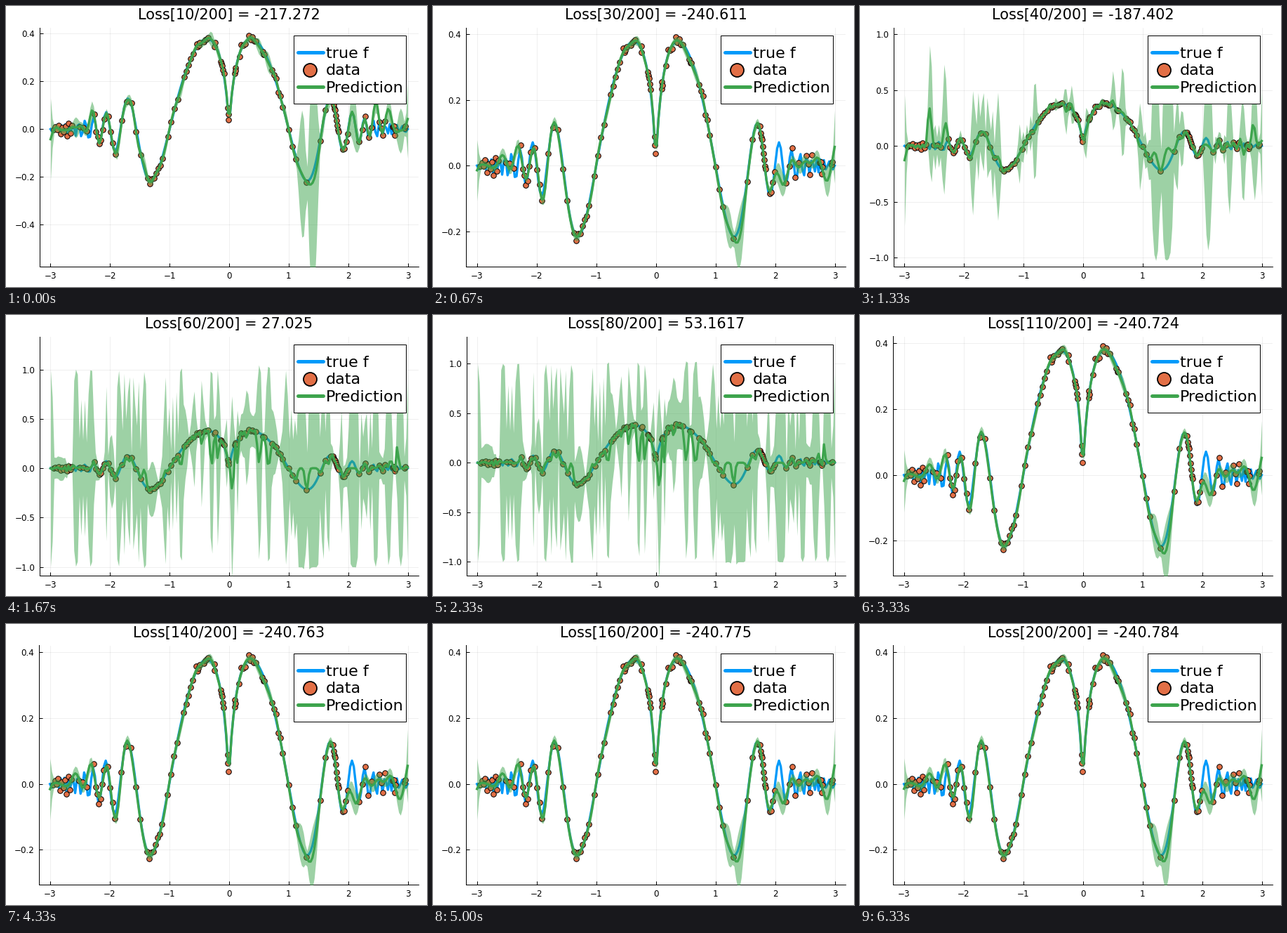
Write a matplotlib script that moves like this. It is 600 px wide and 400 px high and loops after 6660 ms.

```python
import numpy as np
import matplotlib.pyplot as plt
from matplotlib.animation import FuncAnimation
from matplotlib.patches import Rectangle

W, H, DPI = 600, 400, 100
PX = 72 / DPI  # points per pixel
BLUE, ORANGE, GREEN = "#009afa", "#e26f46", "#3da44d"
TOP, BOTTOM, RIGHT = 30.5, 371, 587.8
FRAMES = 20
NOISE = 0.02
GRID = np.linspace(-3, 3, 200)

plt.rcParams["font.family"] = "DejaVu Sans"

# Sampled stretches of the x axis: start, end, number of points.
STRETCHES = [
    (-2.945, -2.64, 12), (-2.51, -2.39, 3), (-2.262, -2.1, 7),
    (-2.033, -1.915, 4), (-1.803, -1.485, 5), (-1.367, -1.12, 8),
    (-1.031, -.865, 4), (-.755, -.605, 5), (-.548, -.495, 4),
    (-.424, -.348, 4), (-.245, -.237, 2), (-.14, -.088, 5),
    (-.022, -.007, 3), (.1, .108, 3), (.171, .271, 4), (.33, .448, 5),
    (.56, .595, 3), (.72, .9, 6), (1.002, 1.119, 3), (1.302, 1.302, 1),
    (1.532, 1.709, 3), (1.744, 1.838, 9), (1.909, 1.991, 4),
    (2.186, 2.392, 5), (2.522, 2.616, 4), (2.75, 2.793, 5), (2.946, 2.957, 2)]

# Training before it settles: kernel length, loss, lowest and highest value.
TRAINING = [
    (.105, -217.272, -.548, .398), (.125, -233.514, -.4, .4),
    (.16, -240.611, -.2875, .4007), (.05, -187.402, -1.02, 1.0),
    (.032, -61.3847, -.975, 1.2), (.025, 27.025, -1.02, 1.266),
    (.023, 42.3182, -1.03, 1.25), (.022, 53.1617, -1.071, 1.2056),
    (.045, -118.206, -1.0, 1.1)]


def true_f(x):
    a = np.abs(x)
    return np.sinc(a ** a)


def prior(x):
    """Cusp at zero, which the smooth kernel cannot follow."""
    return -0.4 * np.exp(-np.abs(x) / 0.1)


def kernel(a, b, length):
    return np.exp(-0.5 * ((a[:, None] - b[None, :]) / length) ** 2)


def predict(length):
    """Posterior mean and deviation of a Gaussian process."""
    gram = kernel(DATA_X, DATA_X, length) + NOISE ** 2 * np.eye(len(DATA_X))
    cross = kernel(GRID, DATA_X, length)
    gain = np.linalg.solve(gram, cross.T).T
    mean = prior(GRID) + gain @ (DATA_Y - prior(DATA_X))
    var = 1 - np.sum(gain * cross, axis=1)
    return mean, np.sqrt(np.maximum(var, 2e-5))


def stage(k):
    """Kernel length, loss and value range of step k."""
    if k < len(TRAINING):
        return TRAINING[k]
    decay = np.exp(-0.319 * (k - 10))
    return 0.16 - 0.002 * decay, -240.788 + 0.064 * decay, -.2855, .4007


rng = np.random.default_rng(4)
DATA_X = np.concatenate([np.linspace(*s) for s in STRETCHES])
DATA_Y = true_f(DATA_X) + rng.normal(0, 0.008, len(DATA_X))
STATES = [predict(stage(k)[0]) for k in range(FRAMES)]

fig = plt.figure(figsize=(W / DPI, H / DPI), dpi=DPI, facecolor="white")
ax = fig.add_axes([0, 0, 1, 1])
over = fig.add_axes([0, 0, 1, 1], zorder=5)
over.set(xlim=(0, W), ylim=(H, 0))
over.axis("off")
title = over.text(318, 18.8, "", size=15, ha="center", va="baseline")


def draw_legend():
    over.add_patch(Rectangle((409.5, 42), 160.5, 97, facecolor="white",
                             edgecolor="black", lw=PX))
    entries = (("true f", BLUE), ("data", ORANGE), ("Prediction", GREEN))
    for i, (label, color) in enumerate(entries):
        y = 66.3 + 24.2 * i
        if label == "data":
            over.plot(433.2, y, "o", ms=19 * PX, mfc=color, mec="black",
                      mew=1.8 * PX)
        else:
            over.plot([415.5, 452], [y, y], color=color, lw=5 * PX,
                      solid_capstyle="round")
        over.text(455.7, y + 8, label, size=16.07, va="baseline")


def tick_label(value):
    sign = "\u2212" if value < -0.01 else ""
    return f"{sign}{abs(value):.1f}"


def style_axes(lo, hi):
    pad = 0.03 * (hi - lo)
    lo, hi = lo - pad, hi + pad
    step = 0.5 if hi - lo > 1.5 else 0.2
    ticks = step * np.arange(np.ceil(lo / step), np.floor(hi / step) + 1)
    left = 47.4 if ticks[0] > -0.3 else 48.2
    ax.set_position([left / W, 1 - BOTTOM / H, (RIGHT - left) / W,
                     (BOTTOM - TOP) / H])
    ax.set(xlim=(-3.18, 3.18), ylim=(lo, hi))
    ax.set_xticks(range(-3, 4))
    ax.set_yticks(ticks, [tick_label(t) for t in ticks])
    ax.tick_params(direction="in", length=5 * PX, width=PX, pad=7 * PX,
                   labelsize=8.57)
    ax.grid(color="black", alpha=0.1, lw=0.6 * PX)
    ax.set_axisbelow(True)
    for side, spine in ax.spines.items():
        spine.set_visible(side in ("left", "bottom"))
        spine.set_linewidth(PX)


def update(k):
    _, loss, lo, hi = stage(k)
    mean, dev = STATES[k]
    ax.clear()
    style_axes(lo, hi)
    line = dict(lw=3.3 * PX, solid_joinstyle="round")
    ax.plot(GRID, true_f(GRID), color=BLUE, zorder=2, **line)
    ax.plot(DATA_X, DATA_Y, "o", ms=7.6 * PX, mfc=ORANGE, mec="black",
            mew=PX, zorder=3)
    ax.fill_between(GRID, mean - dev, mean + dev, color=GREEN, alpha=0.5,
                    lw=0, zorder=4)
    ax.plot(GRID, mean, color=GREEN, zorder=5, **line)
    title.set_text(f"Loss[{10 * (k + 1)}/200] = {loss:.6g}")
    return []


draw_legend()
anim = FuncAnimation(fig, update, frames=FRAMES, init_func=lambda: [],
                     interval=333, repeat=True, repeat_delay=0)
plt.show()
```
